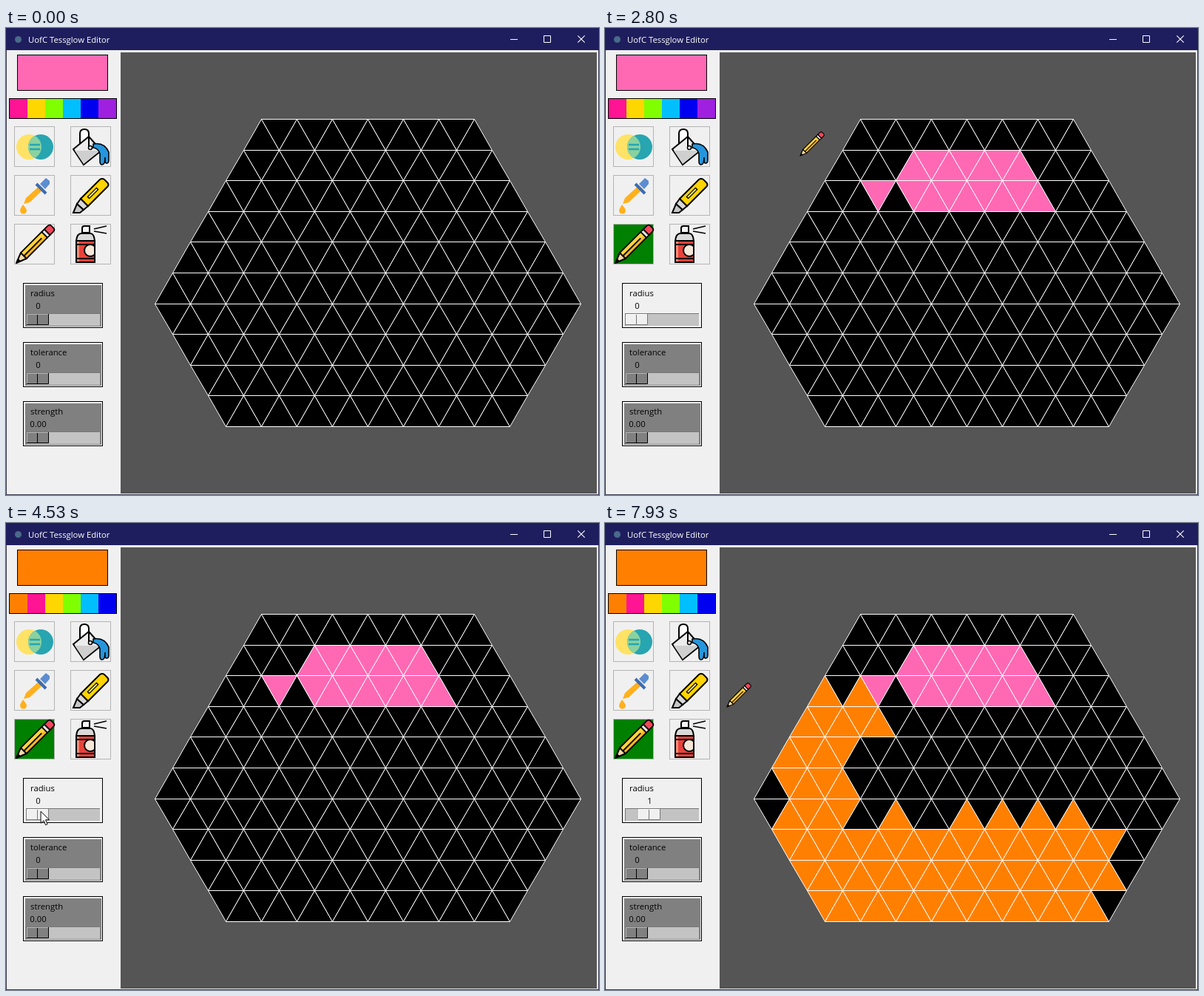
These frames come from a looping animation (802 px wide and 632 px high, 8000 ms). An HTML page with a canvas:

```html
<!DOCTYPE html>
<html lang="en">
<head>
<meta charset="utf-8">
<title>Panel editor</title>
<style>
html, body { margin: 0; width: 100%; height: 100%; overflow: hidden; background: #f0f0f0; }
canvas { display: block; }
</style>
</head>
<body>
<canvas id="stage" width="802" height="632"></canvas>
<script>
const ctx = document.getElementById('stage').getContext('2d');
const LOOP = 8000, STEP = 200 / 3;
const FACE = '#f0f0f0', NAVY = '#1e1e5e', DIM = '#808080', TROUGH = '#c3c3c3';
const PINK = '#ff69b4', ORANGE = '#ff8000';
const UI = '11.3px "Open Sans", "Noto Sans", sans-serif';
const DLG = '10.5px "Liberation Sans", sans-serif';

// Key moments of the session
const PICK_TOOL = 660, OPEN = 3120, PICK_COLOUR = 3660, CLOSE = 4195, SET_RADIUS = 4580;

// ---- drawing helpers ----
function rect(x, y, w, h, fill, line) {
  if (fill) { ctx.fillStyle = fill; ctx.fillRect(x, y, w, h); }
  if (line) { ctx.strokeStyle = line; ctx.lineWidth = 1; ctx.strokeRect(x + .5, y + .5, w - 1, h - 1); }
}
function paint(fill, line, width = 1) {
  if (fill) { ctx.fillStyle = fill; ctx.fill(); }
  if (line) { ctx.strokeStyle = line; ctx.lineWidth = width; ctx.stroke(); }
}
function poly(pts, fill, line, width) {
  ctx.beginPath();
  pts.forEach(([x, y]) => ctx.lineTo(x, y));
  ctx.closePath();
  paint(fill, line, width);
}
function disc(x, y, r, fill, line, width) {
  ctx.beginPath();
  ctx.arc(x, y, r, 0, 7);
  paint(fill, line, width);
}
function shape(d, fill, line, width) {
  const p = new Path2D(d);
  if (fill) { ctx.fillStyle = fill; ctx.fill(p); }
  if (line) { ctx.strokeStyle = line; ctx.lineWidth = width || 1; ctx.stroke(p); }
}
function text(s, x, y, font = UI, fill = '#000', align = 'left') {
  ctx.font = font;
  ctx.fillStyle = fill;
  ctx.textAlign = align;
  ctx.fillText(s, x, y);
}
function at(x, y, draw) {
  ctx.save();
  ctx.translate(x, y);
  draw();
  ctx.restore();
}
function cross(x, y, r, line) {
  shape(`M${x - r} ${y - r}L${x + r} ${y + r}M${x + r} ${y - r}L${x - r} ${y + r}`, null, line, 1.1);
}

// ---- triangular grid ----
const rowY = r => Math.round(r * 41.6) + 123.5;
const colX = c => 201.5 + 24 * c;
const isUp = (r, c) => (r + c) % 2 === 0;
const firstCol = r => r < 6 ? 6 - r : r - 5;
const inGrid = (r, c) => r >= 0 && r < 10 && c >= firstCol(r) && c <= 24 - firstCol(r);
const centre = (r, c) => [colX(c), rowY(r) + (isUp(r, c) ? 27 : 14)];
function run(r, from, to) {
  const dir = Math.sign(to - from), cells = [];
  for (let c = from; c !== to + dir; c += dir) cells.push([r, c]);
  return cells;
}

const strokes = [
  [1130, 1600, PINK, 0, [[2, 7], [2, 9], ...run(1, 9, 13)]],
  [1740, 2480, PINK, 0, [[1, 14], [1, 15], [2, 15], [2, 16], ...run(2, 14, 10)]],
  [5100, 5265, ORANGE, 1, run(3, 6, 4)],
  [5400, 5800, ORANGE, 1, [[4, 4], [4, 3], [5, 3], [5, 4], [6, 4], [6, 3], [7, 3], [7, 4], [8, 4], [8, 5], [9, 5]]],
  [5830, 6460, ORANGE, 1, [...run(9, 6, 18), [8, 19]]],
  [6620, 7400, ORANGE, 1, [...run(7, 19, 11), ...run(7, 9, 7)]]
];
const dabs = strokes.flatMap(([t0, t1, colour, radius, cells]) => cells.map(([r, c], i) =>
  ({ t: t0 + (t1 - t0) * i / (cells.length - 1), colour, radius, r, c })));

// Pointer track: free moves plus the painted cells
const track = [
  [200, 0, 420], [600, 40, 296], [760, 42, 294],
  [1667, 521, 203], [2800, 264, 173], [3050, 78, 62], [3250, 78, 62],
  [3600, 57, 163], [3760, 57, 163], [4040, 54, 331], [4240, 54, 331],
  [4430, 43, 390], [4500, 43, 390], [4640, 60, 391], [4720, 60, 391],
  [5333, 294, 282], [6533, 658, 492], [7933, 165, 249],
  ...dabs.map(d => [d.t, ...centre(d.r, d.c)])
].sort((a, b) => a[0] - b[0]);

function pointer(t) {
  if (t < track[0][0]) return null;
  const i = track.findIndex(k => k[0] > t);
  if (i < 0) return track[track.length - 1].slice(1);
  const [t0, x0, y0] = track[i - 1], [t1, x1, y1] = track[i];
  const k = (t - t0) / (t1 - t0);
  return [x0 + (x1 - x0) * k, y0 + (y1 - y0) * k];
}

function drawGrid(t) {
  const colours = {};
  for (const { t: when, colour, radius, r, c } of dabs) {
    if (when > t) break;
    const hit = [[r, c]];
    if (radius) hit.push([r, c - 1], [r, c + 1], [r + (isUp(r, c) ? 1 : -1), c]);
    hit.forEach(cell => { colours[cell] = colour; });
  }
  for (let r = 0; r < 10; r++) {
    for (let c = 0; c < 25; c++) {
      if (!inGrid(r, c)) continue;
      const x = colX(c), a = rowY(r), b = rowY(r + 1);
      const [tip, base] = isUp(r, c) ? [a, b] : [b, a];
      poly([[x, tip], [x - 24, base], [x + 24, base]], colours[[r, c]] || '#000', '#fff');
    }
  }
}

// ---- pencil, shared by the tool button and the pointer ----
function pencil(x, y, scale) {
  at(x, y, () => {
    ctx.rotate(-Math.PI / 4);
    ctx.scale(scale, scale);
    ctx.lineJoin = 'round';
    poly([[0, 0], [14, -5.5], [14, 5.5]], '#f6d9a5', '#000', 2);
    poly([[0, 0], [6, -2.5], [6, 2.5]], '#000');
    rect(14, -5.5, 40, 11, '#ffd23c');
    rect(14, 1, 40, 4.5, '#f7b52c');
    shape('M14 -5.5H54V5.5H14ZM15 .5H48', null, '#000', 1.8);
    shape('M54 -5.5H59V5.5H54Z', '#e6e6e6', '#000', 1.8);
    shape('M59 -5.5H65Q69 -5.5 69 -2V2Q69 5.5 65 5.5H59Z', '#f0485a', '#000', 1.8);
  });
}
function arrow(x, y) {
  at(x, y, () => poly([[0, 0], [0, 16], [4, 12.5], [6.5, 18.5], [9, 17.4], [6.5, 11.5], [11.5, 11.5]], '#fff', '#000'));
}

// ---- tool icons, in the coordinates of a 55 px button ----
const icons = [
  () => {
    disc(20, 28, 17, '#ffe266');
    disc(36, 28, 17, '#27a5b0');
    ctx.save();
    ctx.beginPath();
    ctx.arc(20, 28, 17, 0, 7);
    ctx.clip();
    disc(36, 28, 17, '#8ad2a0');
    ctx.restore();
    shape('M21 25H35M21 31H35', null, '#27a5b0', 2.5);
  },
  () => {
    shape('M13 25V10Q13 4 19 4Q25 4 25 10V17', '#fff', '#000', 2);
    poly([[4, 31], [25, 14], [42, 33], [18, 52]], '#ececec', '#000', 2);
    poly([[6, 33], [39, 33], [18, 51]], '#cfcfcf');
    shape('M25 12V28', null, '#000', 2);
    disc(27, 29, 2.5, '#fff', '#000', 1.5);
    shape('M31 24Q46 21 52 35V46Q52 50 49 50Q47 50 47 47V42Q47 52 43 52Q40 52 40 47V37Q38 30 31 29Z', '#2596dc', '#000', 1.6);
  },
  () => {
    shape('M35 14L40 19L21 37L13 39L16 31Z', '#ffb01c');
    shape('M30 12L43 25', null, '#3c6bb4', 4);
    poly([[35, 12], [43, 4], [48, 8], [48, 12], [42, 19]], '#5b8dd0');
    shape('M12 40Q8 46 8 48A4.3 4.3 0 0 0 17 48Q17 46 12 40Z', '#ffb01c');
  },
  () => {
    poly([[4, 51], [9, 39], [18, 47], [13, 51]], '#c6c6c6', '#000', 2);
    poly([[9, 39], [14, 32], [24, 42], [18, 47]], '#d8d8d8', '#000', 2);
    shape('M14 32L40 6Q43 4 46 6L50 10Q53 13 50 16L24 42Z', '#ffd400', '#000', 2);
    shape('M24 31L37 18', null, '#000', 4.5);
    shape('M25 30L36 19', null, '#ffe98a', 1.8);
  },
  () => pencil(3, 53, 1),
  () => {
    shape('M16 12V6Q16 3 19 3H26V12Z', '#f5f5f5', '#000', 2);
    shape('M8 23Q9 13 15 13H27Q32 13 33 23Z', '#d9d9d9', '#000', 2);
    rect(8, 23, 25, 29, '#e8433c');
    ctx.save();
    ctx.beginPath();
    ctx.rect(8, 23, 25, 29);
    ctx.clip();
    disc(27, 36, 8, '#f6e6d8', '#000', 2);
    ctx.restore();
    rect(8, 23, 4, 29, '#f58a72');
    shape('M8 23H33V52H8ZM8 28H33M8 47H33', null, '#000', 2);
    shape('M32 7L49 3M32 10L49 13', null, '#000', 1.7);
  }
];

function drawTools(selected) {
  icons.forEach((icon, i) => at(11 + 76 * (i % 2), 133 + 66 * Math.floor(i / 2), () => {
    rect(0, 0, 55, 55, i === 4 && selected ? '#008000' : FACE, '#b4b4b4');
    icon();
  }));
}

function drawSlider(y, name, value, on, shift = 0) {
  rect(23, y, 108, 61, FACE, '#000');
  if (!on) rect(26, y + 3, 103, 56, DIM);
  text(name, 33, y + 18);
  text(value, 43.5 + shift, y + 35, UI, '#000', 'center');
  rect(27, y + 41, 100, 17, TROUGH);
  shape(`M27 ${y + 41.5}H127M27.5 ${y + 41}V${y + 58}`, null, '#777');
  const x = 28 + shift, dark = on ? '#777' : '#000';
  rect(x, y + 42, 30, 15, on ? FACE : DIM);
  shape(`M${x + .5} ${y + 57}V${y + 42.5}H${x + 30}`, null, on ? '#fff' : '#b4b4b4');
  shape(`M${x} ${y + 56.5}H${x + 29.5}V${y + 42}M${x + 14.5} ${y + 43}V${y + 56}`, null, dark);
}

function drawWindow(t) {
  const dialog = t >= OPEN && t < CLOSE, chosen = t >= CLOSE;
  const ink = dialog ? '#999' : '#fff';
  rect(0, 0, 802, 632, FACE, dialog ? '#aaa' : '#3a3a55');
  rect(0, 0, 802, 30, dialog ? '#fff' : NAVY);
  disc(16.5, 15.5, 4.5, '#4a6a8a');
  text('UofC Tessglow Editor', 30, 20, UI, ink);
  shape('M682 15.5H692M727.5 10.5H736.5V19.5H727.5Z', null, ink);
  cross(778, 15, 4.7, ink);

  rect(155, 33, 644, 597, '#555');
  rect(15, 36, 123, 49, chosen ? ORANGE : PINK, '#000');
  const row = ['#ff1493', '#ffd700', '#80ff00', '#00bfff', '#0000f0', '#a020e0'];
  if (chosen) row.unshift(ORANGE);
  for (let i = 0; i < 6; i++) rect(5 + 24 * i, 96, 25, 26, row[i]);
  rect(4, 95, 146, 28, null, '#000');

  const picked = t >= PICK_TOOL, wide = t >= SET_RADIUS;
  drawTools(picked);
  drawSlider(345, 'radius', wide ? '1' : '0', picked, wide ? 17 : 0);
  drawSlider(425, 'tolerance', '0', false);
  drawSlider(505, 'strength', '0.00', false);
  drawGrid(t);
}

// ---- colour dialog ----
const basic = [
  'f88 ff8 8f8 0f8 8ff 08f f8c f8f', 'f00 ff0 8f0 0f4 0ff 08c 88c f0f',
  '844 f84 0f0 088 048 88f 804 f08', '800 f80 080 084 00f 00a 808 80f',
  '400 840 040 044 008 004 404 408', '000 880 884 888 488 ccc 404 fff'
].map(s => s.split(' ').map(c => '#' + c));

function gradient(x0, y0, x1, y1, stops) {
  const g = ctx.createLinearGradient(x0, y0, x1, y1);
  stops.forEach((c, i) => g.addColorStop(i / (stops.length - 1), c));
  return g;
}
function swatch(x, y, fill) {
  rect(x - 1, y - 1, 18, 17, '#fff');
  rect(x - 1, y - 1, 17, 16, '#888');
  rect(x, y, 16, 15, fill);
}
function button(x, y, w, label, state) {
  rect(x, y, w, 21, state === 'off' ? '#ccc' : '#e1e1e1', state === 'off' ? '#bfbfbf' : '#adadad');
  if (state === 'main') {
    ctx.strokeStyle = '#0078d7';
    ctx.lineWidth = 2;
    ctx.strokeRect(x + 1, y + 1, w - 2, 19);
  }
  text(label, x + w / 2, y + 14.5, DLG, state === 'off' ? '#929292' : '#000', 'center');
}
function field(label, value, x, y) {
  text(label, x - 4, y + 14, DLG, '#000', 'right');
  rect(x, y, 27, 20, '#fff', '#7a7a7a');
  text(value, x + 4, y + 14, DLG);
}

function drawDialog(t) {
  const orange = t >= PICK_COLOUR, colour = orange ? ORANGE : PINK;
  ctx.save();
  ctx.shadowColor = 'rgba(0,0,0,.55)';
  ctx.shadowBlur = 16;
  ctx.shadowOffsetY = 4;
  rect(11, 31, 449, 331, FACE);
  ctx.restore();
  rect(11, 31, 449, 331, null, '#555');
  rect(12, 32, 447, 30, NAVY);
  text('Choose Colour 1', 20, 51, UI, '#fff');
  cross(444, 46, 4.7, '#fff');

  text('Basic colors:', 18, 80, DLG);
  basic.forEach((row, r) => row.forEach((c, i) => swatch(23 + 26 * i, 89 + 22 * r, c)));
  if (orange) {
    rect(48, 154, 18, 17, null, '#000');
    ctx.setLineDash([1, 1]);
    rect(46, 151, 23, 23, null, '#000');
    ctx.setLineDash([]);
  }
  text('Custom colors:', 18, 245, DLG);
  for (let i = 0; i < 16; i++) {
    const k = i / 15;
    swatch(23 + 26 * (i % 8), 255 + 22 * (i >> 3), `rgb(${255 - 145 * k},${16 + 16 * k},${16 + 136 * k})`);
  }
  button(19, 307, 205, 'Define Custom Colors >>', 'off');
  button(19, 333, 64, 'OK', 'main');
  button(91, 333, 64, 'Cancel');
  button(241, 333, 211, 'Add to Custom Colors');

  rect(240, 69, 176, 188, gradient(240, 0, 416, 0, ['#f00', '#ff0', '#0f0', '#0ff', '#00f', '#f0f', '#f00']));
  rect(240, 69, 176, 188, gradient(0, 69, 0, 257, ['rgba(128,128,128,0)', 'rgba(128,128,128,1)']));
  ctx.save();
  ctx.beginPath();
  ctx.rect(240, 69, 176, 188);
  ctx.clip();
  const mx = orange ? 255 : 401;
  shape(`M${mx - 8} 70.5h5M${mx + 5} 70.5h5M${mx + .5} 75v5`, null, '#000', 3);
  ctx.restore();
  rect(432, 69, 11, 188, gradient(0, 69, 0, 257, ['#fff', orange ? ORANGE : '#ff0080', '#000']), '#555');
  const ly = orange ? 163 : 125;
  poly([[445, ly], [459, ly - 14], [459, ly + 14]], '#000');

  rect(240, 264, 59, 41, colour);
  text('Color|Solid', 270, 318, DLG, '#000', 'center');
  const values = orange ? [20, 240, 120, 255, 128, 0] : [220, 240, 169, 255, 105, 180];
  ['Hue:', 'Sat:', 'Lum:', 'Red:', 'Green:', 'Blue:'].forEach((s, i) =>
    field(s, values[i], i < 3 ? 336 : 416, 264 + Math.floor(22.5 * (i % 3))));
}

function frame(now) {
  const t = Math.floor((now % LOOP + 4) / STEP) * STEP;
  const dialog = t >= OPEN && t < CLOSE;
  ctx.lineJoin = 'miter';
  drawWindow(t);
  if (dialog) drawDialog(t);
  const p = pointer(t);
  if (p) {
    if (p[0] > 155 && !dialog) pencil(p[0], p[1], .63);
    else arrow(p[0], p[1]);
  }
}

const start = performance.now();
function tick() {
  frame(performance.now() - start);
  requestAnimationFrame(tick);
}
tick();
</script>
</body>
</html>
```
